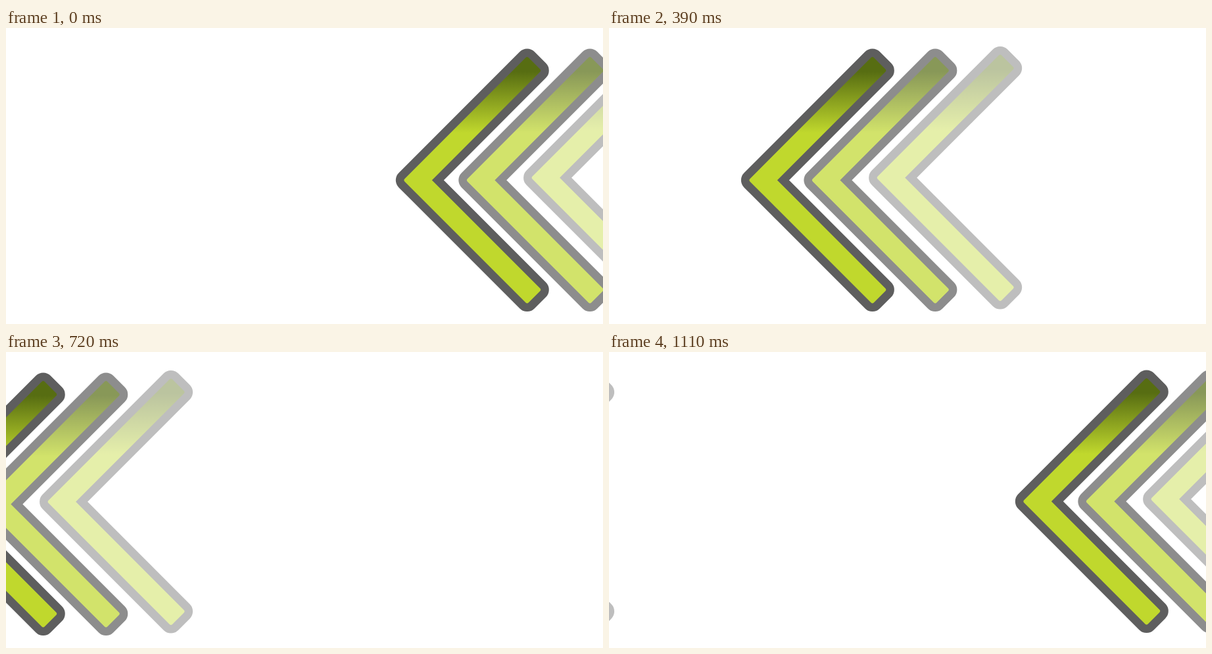
Write an HTML page that moves like this. It is 908x450 px and loops after 1140 ms.

```html
<!DOCTYPE html>
<html lang="en">
<head>
<meta charset="utf-8">
<title>Sliding arrows</title>
<style>
  html, body { margin: 0; width: 100%; height: 100%; overflow: hidden; background: #fff; }
  svg { display: block; width: 908px; height: 450px; }
  .edge { fill: #5e5e5e; stroke: #5e5e5e; stroke-width: 31.4; }
  .face { fill: url(#shade); stroke: url(#shade); stroke-width: 6; }
</style>
</head>
<body>
<svg viewBox="0 0 908 450">
  <defs>
    <linearGradient id="shade" gradientUnits="userSpaceOnUse" x1="0" y1="-165" x2="0" y2="-72">
      <stop offset="0" stop-color="#576d12"/>
      <stop offset="1" stop-color="#c0d82d"/>
    </linearGradient>
    <path id="shape" stroke-linejoin="round"
      d="M15.5 0L199.6 -184.1L217.1 -166.6L50.6 0L217.1 166.6L199.6 184.1Z"/>
    <g id="arrow">
      <use href="#shape" class="edge"/>
      <use href="#shape" class="face"/>
    </g>
    <g id="trio">
      <use href="#arrow"/>
      <use href="#arrow" x="95.5" opacity=".7"/>
      <use href="#arrow" x="194.3" y="-3.6" opacity=".4"/>
    </g>
  </defs>
  <use id="first" href="#trio"/>
  <use id="second" href="#trio"/>
</svg>
<script>
  const LOOP = 1140, TICK = 30;

  // Smooth curve through [tick, x] points
  function curve(points) {
    const last = points.length - 1;
    const gap = i => points[i + 1][0] - points[i][0];
    const slope = i => (points[i + 1][1] - points[i][1]) / gap(i);
    const tangent = i => {
      if (i === 0) return 2 * slope(0) - tangent(1);
      if (i === last) return 2 * slope(last - 1) - tangent(last - 1);
      const a = gap(i - 1), b = gap(i);
      return (b * slope(i - 1) + a * slope(i)) / (a + b);
    };
    return tick => {
      if (tick <= points[0][0]) return points[0][1];
      if (tick >= points[last][0]) return points[last][1];
      let i = 0;
      while (tick >= points[i + 1][0]) i++;
      const h = gap(i), u = (tick - points[i][0]) / h, v = 1 - u;
      return points[i][1] * v * v * (1 + 2 * u) + points[i + 1][1] * u * u * (3 - 2 * u)
        + h * u * v * (tangent(i) * v - tangent(i + 1) * u);
    };
  }

  const groups = [
    { el: document.getElementById('first'), y: 231.3,
      x: curve([[0, 593], [4, 462.3], [10, 294.3], [17, 65.4], [18, 29], [24, -143], [32, -323], [37, -419]]) },
    { el: document.getElementById('second'), y: 227.2,
      x: curve([[26, 984], [32, 775], [37, 618], [38, 593]]) }
  ];

  function draw(ms) {
    const tick = Math.floor(ms % LOOP / TICK);
    for (const { el, x, y } of groups) el.setAttribute('transform', `translate(${x(tick)} ${y})`);
  }

  const start = performance.now();
  function loop() {
    draw(performance.now() - start);
    requestAnimationFrame(loop);
  }
  loop();
</script>
</body>
</html>
```
